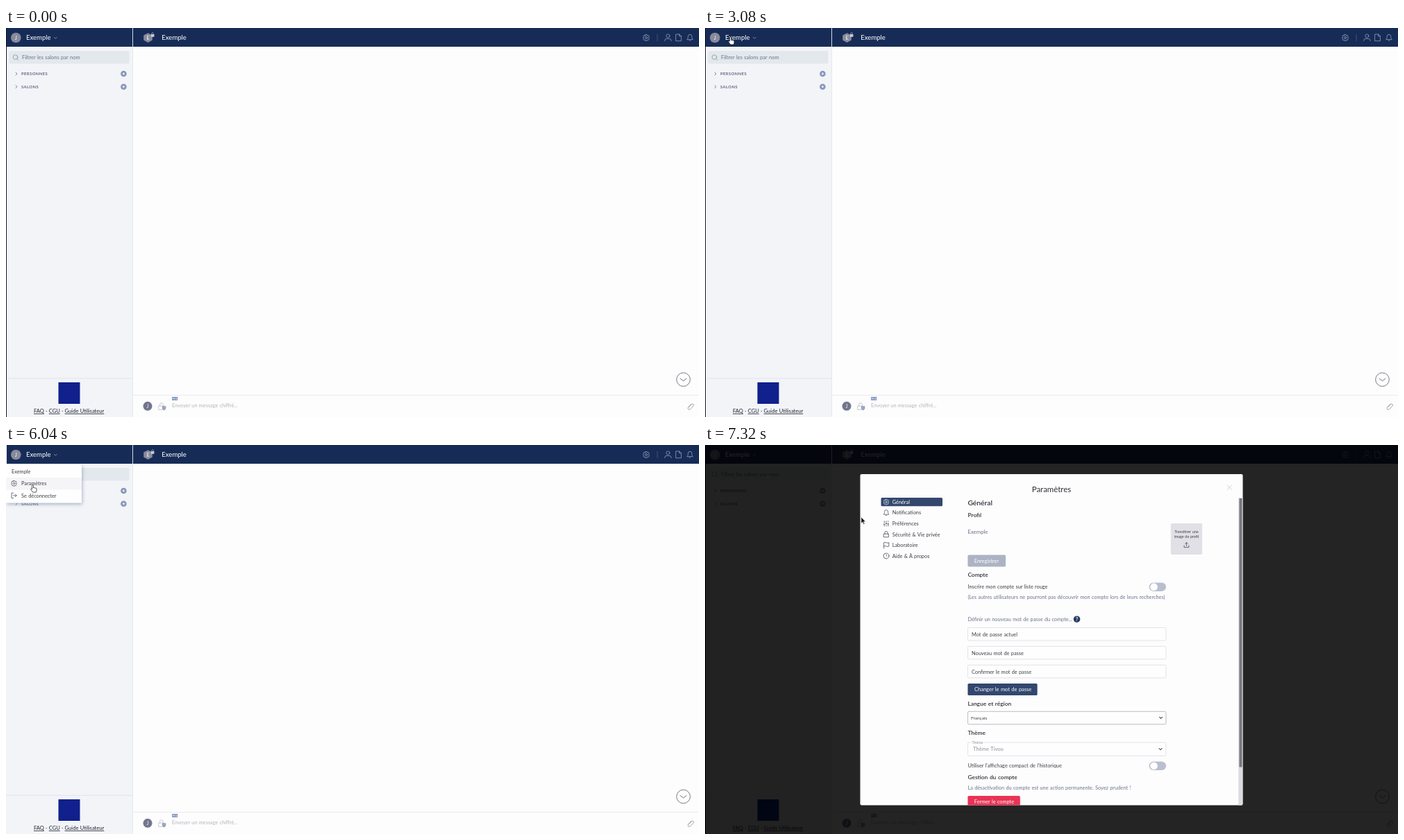
An HTML page for the animation above (7.36 s loop, 998 by 561 pixels).

```html
<!DOCTYPE html>
<html lang="fr">
<head>
<meta charset="utf-8">
<title>Paramètres</title>
<style>
html, body { margin: 0; width: 100%; height: 100%; overflow: hidden; background: #fdfdfd; }
svg { display: block; width: 100vw; height: 100vh; }
text { font: 7.35px Lato, "Open Sans", sans-serif; word-spacing: .06em; fill: #3d3f47; }
.head { font-size: 9.55px; fill: #fff; }
.sect { font-size: 5.9px; font-weight: 700; letter-spacing: .4px; fill: #5e6680; }
.foot { font-size: 7.6px; fill: #1d2230; }
.foot tspan { text-decoration: underline; }
.h1 { font-size: 11.45px; fill: #2e3038; }
.h2 { font-size: 10.3px; font-weight: 600; fill: #2e3038; }
.h3 { font-size: 8.4px; font-weight: 600; fill: #2e3038; }
.soft { fill: #6b7388; }
.pale { fill: #8d9099; }
.light { fill: #fff; }
.tiny { font-size: 5.4px; }
.mid { text-anchor: middle; }
.line { fill: none; stroke: #4b4e58; stroke-width: .8; stroke-linecap: round; stroke-linejoin: round; }
.bar .line { stroke: #a3afc5; stroke-width: .7; }
.field { fill: #fefefe; stroke: #e3e3e8; stroke-width: 1; }
</style>
</head>
<body>
<svg viewBox="0 0 998 561" preserveAspectRatio="none">
  <defs>
    <g id="gear"><circle r="1.5"/><path d="M-1-4.4H1L1.5-3 3-3.7 4.1-2 3.4-.8 4.6 0 3.4 .9 4.1 2.2 3 3.7 1.5 3 1 4.4H-1L-1.5 3-3 3.7-4.1 2.2-3.4.9-4.6 0-3.4-.8-4.1-2-3-3.7-1.5-3Z"/></g>
    <path id="bell" d="M-4 2.6C-2.6 1.4-3-.2-2.7-1.8A2.7 2.7 0 0 1 2.7-1.8C3-.2 2.6 1.4 4 2.6ZM-1 4.2Q0 5 1 4.2"/>
    <path id="lock" d="M-3.4-.4H3.4V4.2H-3.4ZM-2.1-.4V-2A2.1 2.1 0 0 1 2.1-2V-.4"/>
    <path id="chev" d="M-2-1 0 1 2-1"/>
    <g id="plus"><circle r="4.3" fill="#8594b8"/><path d="M-2 0H2M0-2V2" stroke="#fff" stroke-width=".9"/></g>
    <g id="toggle"><rect width="24.5" height="12.5" rx="6.25" fill="#b9bfce"/><circle cx="7" cy="6.25" r="5.3" fill="#fff"/></g>
    <filter id="shadow" x="-20%" y="-20%" width="140%" height="150%">
      <feDropShadow dx="1" dy="2" stdDeviation="2.5" flood-color="#7688a8" flood-opacity=".6"/>
    </filter>
    <clipPath id="panel"><rect x="223.5" y="42" width="551" height="477.5" rx="2"/></clipPath>
  </defs>

  <rect width="998" height="561" fill="#fdfdfd"/>

  <!-- sidebar -->
  <rect y="27" width="182" height="534" fill="#f3f4f8"/>
  <path d="M182.5 27V561" stroke="#e6e7ec"/>
  <rect x="4.5" y="33" width="173" height="18.5" rx="2" fill="#e3e8ed"/>
  <g class="line" style="stroke:#8792a8"><circle cx="13.5" cy="42" r="3.3"/><path d="M16 44.5 17.8 46.4"/></g>
  <text class="soft" x="23" y="45" style="font-size:7.5px">Filtrer les salons par nom</text>
  <path class="line" style="stroke:#5e6680" d="M14 64 16 66 14 68M14 82.7 16 84.7 14 86.7"/>
  <text class="sect" x="22" y="68.1">PERSONNES</text>
  <text class="sect" x="22" y="86.8">SALONS</text>
  <use href="#plus" x="169.4" y="66"/>
  <use href="#plus" x="169.4" y="84.7"/>
  <path d="M0 505.3H182" stroke="#e2e4ea"/>
  <rect x="75.5" y="511" width="31" height="31" fill="#10208c"/>
  <text class="foot" x="40" y="555"><tspan>FAQ</tspan> · <tspan>CGU</tspan> · <tspan>Guide Utilisateur</tspan></text>
  <rect id="edge" width="1" height="561" fill="#10172b"/>

  <!-- header -->
  <rect x="1" width="997" height="27" fill="#162c57"/>
  <path d="M182.5 0V27" stroke="#d3d9e4"/>
  <g class="bar">
    <circle cx="14.3" cy="14" r="7.3" fill="#888a9c"/>
    <text class="light mid" x="14.3" y="16.8">J</text>
    <text class="head" x="29" y="17.3">Exemple</text>
    <use class="line" href="#chev" x="71.3" y="14.3"/>
    <path d="M204.5 7.2 210.8 10.6V17.6L204.5 21 198.2 17.6V10.6Z" fill="#888a9c"/>
    <text class="light mid" x="204.5" y="16.8">E</text>
    <rect x="208.8" y="9" width="4.6" height="3.8" fill="#c9ccd4"/>
    <path class="line" d="M209.8 9V8A1.3 1.3 0 0 1 212.4 8V9"/>
    <text class="head" x="224.3" y="17.3">Exemple</text>
    <use class="line" href="#gear" x="922" y="14"/>
    <path d="M938 9V19" stroke="#41547a"/>
    <g class="line">
      <circle cx="953.3" cy="11.4" r="2.5"/>
      <path d="M948.8 18.6V17.4Q949 15.5 951.2 15.5H955.4Q957.6 15.5 957.8 17.4V18.6"/>
      <path d="M965 9H969.6L972.4 11.8V18.7H965ZM969.6 9V11.8H972.4"/>
    </g>
    <use class="line" href="#bell" x="985" y="13.8"/>
  </g>

  <!-- composer -->
  <path d="M183 529.7H998" stroke="#e9e9ec"/>
  <circle cx="204" cy="545.3" r="6.5" fill="#74768e"/>
  <text class="light mid" x="204" y="547.8" style="font-size:6.8px">J</text>
  <use class="line" style="stroke:#c3c6d0" href="#lock" transform="translate(224 545.5) scale(1.15)"/>
  <path d="M224.8 545.3H230.4V548.6Q230 550.6 227.6 551.6 225.2 550.6 224.8 548.6Z" fill="#9da5bd"/>
  <rect x="239" y="532" width="8.2" height="5" rx=".6" fill="#8497c2"/>
  <path d="M240.4 535.8V533.4L241.6 534.8 242.8 533.4V535.8M245.4 533.2V535.7M244.5 534.9 245.4 535.8 246.3 534.9" fill="none" stroke="#fff" stroke-width=".5"/>
  <text x="239" y="546.8" style="fill:#b3b5bd">Envoyer un message chiffré...</text>
  <path class="line" style="stroke:#8e919c" d="M983.4 547 987.3 542.8Q988.8 541.6 990 542.8 991 544 990 545.2L985.5 549.8Q984 551 982.6 549.8 981.4 548.2 982.6 546.8L987 542.2"/>
  <circle cx="975.5" cy="507" r="9.8" fill="#fefefe" stroke="#565b68" stroke-width=".8"/>
  <path class="line" d="M971 505.5 975.5 509 980 505.5"/>

  <!-- account menu -->
  <g id="menu">
    <rect y="28" width="109" height="55.5" fill="#fefefe" filter="url(#shadow)"/>
    <rect id="hover" y="47" width="109" height="17.5" fill="#f5f5f8"/>
    <text x="8" y="40.6">Exemple</text>
    <use class="line" href="#gear" transform="translate(11.5 55.4) scale(.88)"/>
    <text x="22" y="58.2">Paramètres</text>
    <path class="line" d="M10.5 69.2H8V76.6H10.5M10.5 72.9H15.2M13.3 71 15.2 72.9 13.3 74.8"/>
    <text x="22" y="75.8">Se déconnecter</text>
  </g>

  <!-- settings dialog -->
  <g id="dialog">
    <rect width="998" height="561" fill="#000" opacity=".86"/>
    <g clip-path="url(#panel)">
      <rect x="223" y="42" width="552" height="478" fill="#fdfdfe"/>
      <text class="h1 mid" x="499" y="68">Paramètres</text>
      <path class="line" style="stroke:#c8cad0" d="M752 58 758.4 64.4M758.4 58 752 64.4"/>
      <rect x="768.2" y="76" width="6.3" height="444" fill="#dcdce0"/>
      <rect x="769.4" y="77" width="4" height="387.5" fill="#77777c"/>

      <rect x="253.5" y="76" width="88.5" height="12.3" rx="1.6" fill="#34486d"/>
      <g id="tabs"></g>
      <use class="line" style="stroke:#dfe4ee" href="#gear" transform="translate(261 82.2) scale(.85)"/>
      <use class="line" href="#bell" transform="translate(261 97.6) scale(.9)"/>
      <path class="line" d="M258.2 109.8V112M258.2 114.2V117M261 109.8V113.6M261 115.8V117M263.8 109.8V111.2M263.8 113.6V117M257.3 114.2H259.1M260.1 113.6H261.9M262.9 113.6H264.7"/>
      <use class="line" href="#lock" transform="translate(261 128.6)"/>
      <path class="line" d="M257.6 149V140.8Q259.4 139.8 261.2 140.8T264.8 140.8V146Q263 147 261.2 146T257.6 146"/>
      <circle class="line" cx="261" cy="160" r="4"/>
      <text class="mid" x="261" y="162" style="font-size:5.8px">?</text>

      <text class="h2" x="378.4" y="86.5">Général</text>
      <text class="h3" x="378.4" y="104.4">Profil</text>
      <text class="soft" x="378.4" y="128.4" style="font-size:7.8px">Exemple</text>
      <rect x="670.8" y="113" width="45.2" height="45" rx="2" fill="#e0e0e6"/>
      <text class="tiny mid" x="693.4" y="127.2">Transférer une</text>
      <text class="tiny mid" x="693.4" y="134.1">image de profil</text>
      <path class="line" d="M690 145V147.6H696.8V145M693.4 145.6V140.8M691.6 142.4 693.4 140.6 695.2 142.4"/>
      <rect x="378.4" y="158.5" width="54.6" height="17" rx="1.6" fill="#acb4c4"/>
      <text class="light" x="387.8" y="169.6">Enregistrer</text>

      <text class="h3" x="378.4" y="190.2">Compte</text>
      <text x="378.4" y="207">Inscrire mon compte sur liste rouge</text>
      <use href="#toggle" x="639.5" y="198.4"/>
      <text class="soft" x="378.4" y="222">(Les autres utilisateurs ne pourront pas découvrir mon compte lors de leurs recherches)</text>
      <text class="soft" x="378.4" y="254">Définir un nouveau mot de passe du compte...</text>
      <circle cx="535.5" cy="251.2" r="4.8" fill="#2a3c64"/>
      <text class="light mid" x="535.5" y="253.9" style="font-weight:700">?</text>
      <g id="inputs"></g>
      <rect x="378.4" y="344" width="100.2" height="17" rx="1.6" fill="#32476f"/>
      <text class="light" x="388" y="355.1" style="font-size:7.5px">Changer le mot de passe</text>

      <text class="h3" x="378.4" y="375.8">Langue et région</text>
      <rect class="field" x="378.5" y="384.3" width="285.4" height="18.5" rx="1.5" style="stroke:#bdbdbe"/>
      <text x="383" y="395.6" style="font-size:6.5px">Français</text>
      <use class="line" href="#chev" x="656.5" y="393.4" style="stroke-width:1.1"/>

      <text class="h3" x="378.4" y="417.8">Thème</text>
      <rect class="field" x="378.5" y="429" width="285.4" height="19.2" rx="1.5"/>
      <rect x="383.5" y="427" width="18" height="5" fill="#fdfdfe"/>
      <text class="pale" x="384.5" y="431.2" style="font-size:5.2px">Thème</text>
      <text class="pale" x="386" y="441.4" style="font-size:7.6px">Thème Tivou</text>
      <use class="line" href="#chev" x="656" y="438.6" style="stroke-width:1.1"/>
      <text x="378.4" y="464.8">Utiliser l'affichage compact de l'historique</text>
      <use href="#toggle" x="639.5" y="456.6"/>

      <text class="h3" x="378.4" y="481.6">Gestion du compte</text>
      <text class="soft" x="378.4" y="497.2">La désactivation du compte est une action permanente. Soyez prudent !</text>
      <rect x="378.4" y="506" width="75.4" height="17" rx="1.6" fill="#ea3355"/>
      <text class="light" x="387.8" y="517.2">Fermer le compte</text>
    </g>
  </g>

  <g id="pointer" stroke-width=".7" stroke-linejoin="round">
    <path id="arrow" d="M0 0V9.5L2.2 7.4 3.7 10.7 5.2 10 3.7 6.8H6.5Z" fill="#111" stroke="#fff"/>
    <path id="hand" transform="translate(1.5 -1.5)" d="M-1 .8A1 1 0 0 1 1 .8V4.4H1.3A.9.9 0 0 1 2.8 4.6 .9.9 0 0 1 4.3 4.9 .8.8 0 0 1 5.5 5.7V8.2L4.8 10.6H.2L-2.6 6.8A.9.9 0 0 1-1.2 5.7L-1 6Z" fill="#fff" stroke="#111"/>
  </g>
</svg>
<script>
const LOOP = 7360, MENU_AT = 4100, DIALOG_AT = 6140;
const $ = id => document.getElementById(id);
const show = (id, on) => { $(id).style.display = on ? "" : "none"; };

const label = (x, y, text, cls = "") => `<text class="${cls}" x="${x}" y="${y}">${text}</text>`;

$("tabs").innerHTML = ["Général", "Notifications", "Préférences", "Sécurité &amp; Vie privée", "Laboratoire", "Aide &amp; À propos"]
  .map((name, i) => label(269.7, 84.9 + i * 15.58, name, i ? "" : "light")).join("");

$("inputs").innerHTML = ["Mot de passe actuel", "Nouveau mot de passe", "Confirmer le mot de passe"]
  .map((name, i) => {
    const y = 263.4 + i * 27;
    return `<rect class="field" x="378.5" y="${y}" width="285.4" height="18.5" rx="1.5"/>` + label(384, y + 12.1, name);
  }).join("");

// Pointer stops: time, x, y
const path = [
  [1000, 136, 275], [3040, 35, 14.8], [4300, 35, 14.8], [5200, 37, 56],
  [5500, 37, 56], [6000, 37, 59], [6240, 37, 59], [7360, 225.5, 104]
];

function pointerAt(t) {
  const i = Math.max(1, path.findIndex(stop => stop[0] > t));
  const [t0, x0, y0] = path[i - 1], [t1, x1, y1] = path[i];
  const p = Math.max(0, (t - t0) / (t1 - t0));
  const k = p * p * (3 - 2 * p);
  return [x0 + (x1 - x0) * k, y0 + (y1 - y0) * k];
}

function draw(now) {
  const t = now % LOOP;
  const [x, y] = pointerAt(t);
  const dialog = t >= DIALOG_AT;
  const menu = t >= MENU_AT && !dialog;
  const onRow = menu && y > 47 && y < 64;
  const onName = t < MENU_AT && y < 27;
  const hand = onRow || onName;
  show("menu", menu);
  show("edge", !menu);
  show("hover", onRow);
  show("dialog", dialog);
  show("pointer", t >= path[0][0]);
  show("hand", hand);
  show("arrow", !hand);
  $("pointer").setAttribute("transform", `translate(${x} ${y})`);
}

const start = performance.now();
function tick() {
  draw(performance.now() - start);
  requestAnimationFrame(tick);
}
tick();
</script>
</body>
</html>
```
